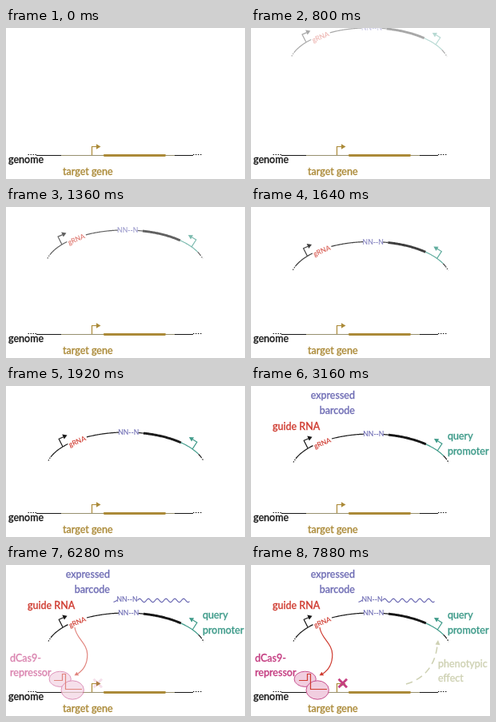
Recreate the animation shown at these times as an HTML page. Size 299 by 189 pixels, loop 8 s.

```html
<!DOCTYPE html>
<html lang="en">
<head>
<meta charset="utf-8">
<title>Reporter circuit</title>
<style>
  html, body { margin: 0; width: 100%; height: 100%; overflow: hidden; background: #fff; }
  svg { display: block; width: 100vw; height: 100vh; }
  text { font: 500 12.5px Lato, sans-serif; fill: currentColor; stroke: currentColor; stroke-width: .3; }
  .small { font-size: 8.6px; stroke-width: .1; }
  .end { text-anchor: end; }
  .mid { text-anchor: middle; }
  .line { fill: none; stroke: currentColor; stroke-width: 1.2; }
  .thick { stroke-width: 2.9; }
  .head { fill: currentColor; }
  .black { color: #161616; }
  .gold { color: #ab8a38; }
  .tan { color: #96906f; }
  .teal { color: #3f9b8a; }
  .red { color: #cf3b30; }
  .violet { color: #706eb5; }
  .pink { color: #c43c80; }
  .olive { color: #9ba163; }
  .dots { stroke-dasharray: 1.5 1.5; }
</style>
</head>
<body>
<svg viewBox="0 0 299 189" preserveAspectRatio="none">
  <g id="genome">
    <path class="line black dots" d="M27.5 158.5H38M234 158.5H244.5"/>
    <path class="line black" d="M38 159.5H69M211 159.5H234"/>
    <path class="line tan" d="M69 159.5H122M200 159.5H211"/>
    <path class="line thick gold" stroke-linecap="round" d="M123.2 159.5H198.6"/>
    <path class="line gold" d="M107.5 159V148.5H114"/>
    <path class="head gold" d="M113 145.3L118.5 148.5L113 151.7Z"/>
    <text class="black" x="3" y="168.6">genome</text>
    <text class="gold" x="71" y="183.6">target gene</text>
  </g>

  <g id="plasmid">
    <path class="line black dots" data-arc="53 56"/>
    <path class="line black" data-arc="56 77.5"/>
    <path class="line black" data-arc="101 141"/>
    <path class="line black" data-arc="165.5 172"/>
    <path class="line thick black" data-arc="172 219"/>
    <path class="line teal" data-arc="219 241"/>
    <path class="line black" data-arc="241 244"/>
    <path class="line black dots" data-arc="244 247.3"/>
    <path class="line black" d="M71 77.8L66.2 68.3L72 65.8"/>
    <path class="head black" d="M70.3 62.6L76.6 63.7L72.9 68.6Z"/>
    <path class="line teal" d="M233.3 81L239 72.2L233.5 68.8"/>
    <path class="head teal" d="M229 66.1L235.2 66.3L232.2 71.6Z"/>
    <text class="red small mid" transform="translate(90.4 74.2) rotate(-23)" font-weight="600">gRNA</text>
    <text class="violet small mid" x="153.3" y="63.4">NN--N</text>
  </g>

  <text id="guide" class="red" x="27" y="54.8">guide RNA</text>

  <g id="labels">
    <g class="violet">
      <text class="end" x="130" y="15.8">expressed</text>
      <text class="end" x="130" y="34.8">barcode</text>
    </g>
    <g class="teal">
      <text x="246" y="67.4">query</text>
      <text x="246" y="85.8">promoter</text>
    </g>
  </g>

  <g id="transcript" class="violet">
    <path class="line" d="M134.5 46.4Q137 46 139.5 43.8"/>
    <text class="small mid" x="151.5" y="46.4">NN--N</text>
    <path id="wave" class="line"/>
  </g>

  <g id="cas">
    <g fill="#f1cee0" stroke="#c8508f">
      <ellipse cx="67.7" cy="142.8" rx="13.6" ry="9.6"/>
      <ellipse cx="83.2" cy="156.5" rx="14.2" ry="11.7"/>
    </g>
    <g class="red">
      <path class="line" d="M60 144.5H70.5V136.5H74.5V155.5H95"/>
      <path class="line" d="M86 78C87 91 101.8 98 101.8 112C101.8 124 97 131.5 89.5 136.3"/>
      <path class="head" d="M85.5 138.2L88.4 133.8L91.2 138.2Z"/>
    </g>
    <g class="pink">
      <text x="5" y="120.6">dCas9-</text>
      <text x="5" y="138.8">repressor</text>
    </g>
  </g>

  <path id="cross" class="line thick pink" d="M109.6 142.7L120 153.3M120 142.7L109.6 153.3"/>

  <g id="effect" class="olive">
    <path d="M194 149C212 144 230 130 233 101" fill="none" stroke="currentColor" stroke-width="1.6" stroke-dasharray="8.5 5.5"/>
    <path class="head" d="M234 94L236.6 100.2L230.6 99.6Z"/>
    <text x="234" y="127.8">phenotypic</text>
    <text x="234" y="146">effect</text>
  </g>
</svg>
<script>
  const LOOP = 8000, STEP = 40;
  const get = id => document.getElementById(id);

  function curve(x0, x1, fn) {
    const n = Math.ceil(x1 - x0);
    let d = '';
    for (let i = 0; i <= n; i++) {
      const x = x0 + (x1 - x0) * i / n;
      d += (i ? 'L' : 'M') + x.toFixed(2) + ' ' + fn(x).toFixed(2);
    }
    return d;
  }

  // Upper part of the plasmid ellipse
  const ringY = x => 107 - 47 * Math.sqrt(1 - ((x - 150) / 100) ** 2);
  for (const el of document.querySelectorAll('[data-arc]')) {
    const [a, b] = el.dataset.arc.split(' ').map(Number);
    el.setAttribute('d', curve(a, b, ringY));
  }
  get('wave').setAttribute('d', curve(164.5, 229.5, x => 44.4 - 2.2 * Math.sin((x - 164.5) * 2 * Math.PI / 11)));

  const ramp = (t, from, to) => Math.min(1, Math.max(0, (t - from) / (to - from)));
  const fade = (id, v) => get(id).setAttribute('opacity', v);

  function draw(time) {
    const t = Math.floor(time / STEP) * STEP;
    const p = ramp(t, 120, 1960);
    get('plasmid').setAttribute('transform', `translate(${-3.5 * (1 - p)} ${-95.5 * (1 - p)})`);
    fade('plasmid', p);
    fade('guide', t >= 1960 ? 1 : 0);
    fade('labels', t >= 3160 ? 1 : 0);
    fade('transcript', t >= 3960 ? 1 : 0);
    fade('cas', ramp(t, 5040, 7040));
    fade('cross', ramp(t, 5960, 7920));
    fade('effect', ramp(t, 6960, 8880));
  }

  const start = performance.now();
  function tick() {
    draw((performance.now() - start) % LOOP);
    requestAnimationFrame(tick);
  }
  tick();
</script>
</body>
</html>
```
